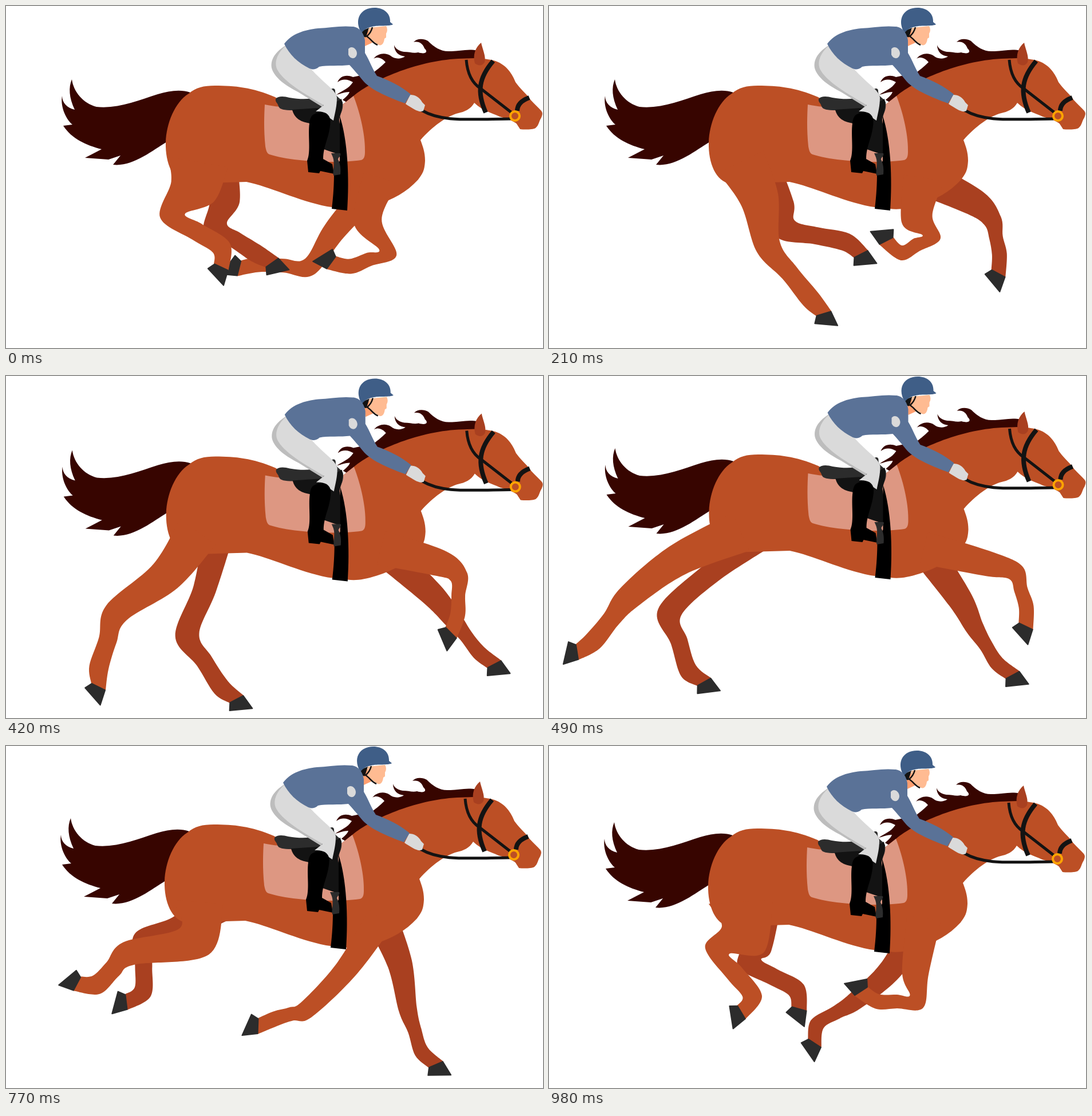
These frames come from a looping animation (938x597 px, 1050 ms). An HTML page with a canvas:

```html
<!DOCTYPE html>
<html lang="en">
<head>
<meta charset="utf-8">
<title>Gallop</title>
<style>
html, body { margin: 0; width: 100%; height: 100%; overflow: hidden; background: #fff; }
canvas { display: block; }
</style>
</head>
<body>
<canvas id="stage" width="938" height="597"></canvas>
<script>
const ctx = document.getElementById('stage').getContext('2d');
const STEP = 70, STEPS = 15;
const COAT = '#bc4f25', SHADE = '#a94020', HOOF = '#2c2c2c', MANE = '#370500',
      INK = '#131313', CLOTH = '#dadada', SILK = '#5a7297';

// A shape is [colour, path, stroke width (0 = fill)].
const shape = (color, d, width = 0) => [color, new Path2D(d), width];

const horse = [
  shape(MANE, 'M322 151C305 145 285 148 265 154C230 165 195 180 158 176C135 170 118 150 115 128C109 142 110 160 120 181C106 178 98 168 98 157C95 172 102 195 116 207L100 209C115 232 140 243 167 250L138 265L179 268L200 261L187 277C220 281 255 253 281 237L340 200Z'),
  shape(MANE, 'M820 95L824 78C805 74 790 80 775 79C760 80 748 72 737 61C728 56 717 57 712 63C722 61 728 66 731 74C738 80 733 85 720 81C712 83 705 80 695 80C685 78 680 74 678 68C678 80 686 87 697 88C688 94 678 92 672 87C663 81 650 82 642 92C650 87 658 92 663 98C655 106 645 114 640 117L606 124C595 119 583 122 579 133C588 126 598 128 606 133C598 145 588 147 577 155C585 153 592 150 600 150C598 156 592 160 588 164L595 168L650 145Z'),
  shape(COAT, 'M319 153C332 142 345 139 365 139C400 139 430 142 470 159L490 172L580 178L607 157C640 130 715 96 790 92L820 91C840 92 848 94 855 96C875 103 885 120 890 133C897 143 905 150 914 160C916 165 925 172 935 183C938 187 937 190 935 195C930 203 931 208 925 213C920 216 905 216 898 215C893 208 893 206 890 204C878 197 868 195 862 193C850 187 832 183 818 169C812 180 800 185 790 187C770 192 745 210 724 234C728 245 732 255 732 270C731 288 728 292 720 303C700 325 675 338 647 347C625 354 610 356 596 354C585 353 570 351 561 350C510 340 460 315 420 307L316 310C292 306 278 275 279 238C280 205 295 168 319 153Z'),
  shape(SHADE, 'M830 64C820 72 815 85 819 100C825 105 832 105 836 98C839 88 832 75 830 64Z')
];

const rider = [
  shape(INK, 'M804 94C806 120 815 135 829 144L883 186', 5),
  shape(INK, 'M851 96C826 125 822 150 838 186', 8),
  shape(INK, 'M914 160C900 165 893 172 893 183', 8),
  shape(INK, 'M726 182C760 202 800 198 881 197', 5),
  shape('#ffa400', 'M881 192a8 8 0 1 0 16 0a8 8 0 1 0-16 0Z', 4),
  shape('#dd9782', 'M452 172C470 176 485 176 500 178L588 172L607 157C620 190 628 230 627 255C627 263 625 268 620 269C580 275 500 272 460 259C455 257 454 250 453 245C450 215 451 190 452 172Z'),
  shape(HOOF, 'M471 162C475 157 485 157 495 160C530 166 550 160 565 147C570 142 576 143 575 150C576 160 585 160 588 168C590 185 582 192 575 200L530 205L500 182C487 182 478 181 476 175C474 168 470 168 471 162Z'),
  shape(INK, 'M500 181C520 180 540 178 560 177L586 162C590 182 582 192 582 200C586 220 586 240 584 260L552 249L535 205C515 204 503 195 500 181Z'),
  shape('#000', 'M583 192C597 235 600 300 596 357L569 354C572 330 573 310 573 290L583 270Z'),
  shape('#000', 'M540 188C552 182 562 184 566 190C568 205 565 220 560 235C557 245 554 255 554 267L570 276L573 293L549 288L547 292L528 290L526 270C533 255 527 225 530 205C531 195 534 190 540 188Z'),
  shape(HOOF, 'M568 257L584 257C586 262 580 264 580 268C584 275 585 285 584 294L572 296C570 288 575 275 571 264Z'),
  shape('#bdbdbd', 'M488 69C468 82 462 95 464 108C468 125 490 140 510 150L552 176L560 165Z'),
  shape(CLOTH, 'M488 70C471 85 468 102 475 113C488 135 530 158 555 173L541 184C552 184 562 185 566 196L572 200C575 185 578 175 578 160C578 148 555 135 532 109L500 78Z'),
  shape('#ff9f70', 'M624 45L640 40L640 64L627 70Z'),
  shape('#ffbb92', 'M634 38L664 35C667 40 666 45 664 48L664 55L661 57C660 65 657 70 651 68C645 65 645 62 640 64L633 55Z'),
  shape(INK, 'M620 44C622 52 626 56 629 54L634 38Z'),
  shape(INK, 'M640 37C638 45 635 49 630 53C637 57 641 65 649 68', 2.5),
  shape('#3f5e87', 'M621 47C610 30 614 9 635 4C655 0 672 10 671 28L676 32C670 36 650 33 640 36C630 38 625 42 621 47Z'),
  shape(CLOTH, 'M706 155C715 155 722 159 727 168L732 173L729 183C722 187 712 180 698 171Z'),
  shape(SILK, 'M486 66C500 48 520 42 545 39C565 38 585 34 605 36C615 36 625 45 627 60L627 82C635 95 640 110 648 122C670 130 690 140 707 154L697 170C670 160 640 148 625 132C615 120 605 108 600 103C585 105 560 103 547 106C540 112 535 111 530 109C510 99 495 85 486 66Z'),
  shape(CLOTH, 'M598 75C603 68 613 74 613 83C612 93 602 94 598 85Z')
];

// Anatomy: fixed hip and half widths. Legs in order: near hind, far hind, two fore legs.
const fore = { hip: [655, 300], thigh: 28, knee: 16, cannon: 12 };
const anatomy = [
  { hip: [335, 272], thigh: 42, knee: 22, cannon: 16 },
  { hip: [370, 280], thigh: 27, knee: 21, cannon: 15 },
  fore, fore
];

const sub = (a, b) => [a[0] - b[0], a[1] - b[1]];
const add = (a, b, k = 1) => [a[0] + b[0] * k, a[1] + b[1] * k];
const lerp = (a, b, k) => add(a, sub(b, a), k);
const unit = v => [v[0] / Math.hypot(...v), v[1] / Math.hypot(...v)];
const polar = deg => [Math.cos(deg * Math.PI / 180), Math.sin(deg * Math.PI / 180)];
const forward = d => [d[1], -d[0]];

// Each leg pose: thigh, knee and top of the hoof, then the hoof's direction in degrees.
const pose = (step, dx, dy, ...legs) => ({
  step, shift: [dx, dy],
  legs: legs.map(([tx, ty, kx, ky, hx, hy, angle], i) => {
    const joints = [anatomy[i].hip, [tx, ty], [kx, ky], [hx, hy]];
    return { bones: joints.slice(1).map((p, j) => sub(p, joints[j])), angle };
  })
});

const poses = [
  pose(0, 0, 0, [326, 324, 291, 366, 376, 456, 115], [382, 340, 366, 386, 465, 448, 55],
    [632, 376, 667, 430, 568, 448, 216], [575, 391, 530, 455, 407, 458, 194]),
  pose(3, 0, 0, [368, 338, 383, 420, 480, 537, 73], [404, 350, 415, 390, 545, 433, 63],
    [745, 344, 775, 375, 785, 467, 118], [643, 372, 668, 403, 589, 410, 243]),
  pose(5, 1, 5, [327, 341, 240, 405, 277, 534, 62], [406, 355, 412, 425, 523, 522, 64],
    [770, 365, 815, 400, 893, 474, 63], [752, 327, 768, 350, 722, 441, 154]),
  pose(7, .5, -2, [224, 322, 140, 386, 49, 482, 171], [284, 343, 211, 412, 271, 534, 61],
    [718, 390, 744, 440, 810, 522, 62], [768, 328, 815, 343, 833, 437, 116]),
  pose(9, -4, -2, [282, 310, 165, 345, 36, 405, 186], [225, 355, 153, 410, 57, 495, 178],
    [589, 378, 560, 460, 570, 536, 65], [752, 374, 814, 423, 904, 481, 53]),
  pose(11, -2, -2, [329, 341, 215, 362, 124, 415, 208], [300, 320, 242, 340, 210, 447, 173],
    [594, 390, 525, 460, 440, 489, 182], [688, 380, 702, 460, 751, 556, 67]),
  pose(14, -1, 5, [339, 337, 294, 357, 336, 465, 149], [362, 352, 351, 380, 437, 459, 106],
    [640, 397, 642, 446, 545, 428, 237], [597, 390, 535, 445, 464, 519, 123])
];

// Turns and stretches one bone towards another.
function turn(u, v, k) {
  const angle = k * Math.atan2(u[0] * v[1] - u[1] * v[0], u[0] * v[0] + u[1] * v[1]);
  const size = 1 + k * (Math.hypot(...v) / Math.hypot(...u) - 1);
  const c = size * Math.cos(angle), s = size * Math.sin(angle);
  return [u[0] * c - u[1] * s, u[0] * s + u[1] * c];
}

const mixLeg = (p, q, k) => ({
  bones: p.bones.map((b, i) => turn(b, q.bones[i], k)),
  angle: p.angle + (q.angle - p.angle) * k
});

function smooth(p) {
  ctx.lineTo(...p[0]);
  for (let i = 0; i < p.length - 1; i++) {
    const a = p[i], b = p[i + 1], before = p[i - 1] || a, after = p[i + 2] || b;
    ctx.bezierCurveTo(...add(a, sub(b, before), 1 / 6), ...add(b, sub(after, a), -1 / 6), ...b);
  }
}

function drawLeg({ bones, angle }, { hip, thigh, knee, cannon }, color) {
  const [stifle, hock, top] = bones.map((_, i) => bones.slice(0, i + 1).reduce((p, b) => add(p, b), hip));
  const down = polar(angle), across = forward(down);
  // The pastern leans back from the hoof by a constant angle.
  const fetlock = add(top, polar(angle - 25), -34);
  const joints = [hip, stifle, hock, lerp(hock, fetlock, .5), fetlock, top];
  // A shorter upper leg is a thicker one.
  const bulk = thigh * Math.sqrt(100 / Math.hypot(...sub(hock, hip)));
  const widths = [bulk * 1.3, bulk, knee, cannon, cannon + 1, 14];

  const dirs = joints.slice(1).map((p, i) => unit(sub(p, joints[i])));
  const sides = joints.map((p, i) => {
    const along = i === 0 ? dirs[0] : i === 5 ? down : unit(add(dirs[i - 1], dirs[i]));
    return [1, -1].map(s => add(p, forward(along), s * widths[i]));
  });
  ctx.fillStyle = color;
  ctx.beginPath();
  smooth(sides.map(s => s[0]));
  smooth(sides.map(s => s[1]).reverse());
  ctx.fill();

  ctx.fillStyle = ctx.strokeStyle = HOOF;
  ctx.lineWidth = 2;
  ctx.beginPath();
  for (const [x, y] of [[13, 0], [17, 27], [-20, 12], [-13, 0]])
    ctx.lineTo(...add(add(top, across, x), down, y));
  ctx.closePath();
  ctx.fill();
  ctx.stroke();
}

function drawShapes(shapes, [dx, dy]) {
  ctx.save();
  ctx.translate(dx, dy);
  for (const [color, path, width] of shapes) {
    ctx.fillStyle = ctx.strokeStyle = color;
    ctx.lineWidth = width;
    if (width) ctx.stroke(path); else ctx.fill(path);
  }
  ctx.restore();
}

function draw(step) {
  const i = poses.findLastIndex(p => p.step <= step);
  const p = poses[i], q = poses[i + 1] || p;
  const k = (step - p.step) / (q.step - p.step || 1);
  const shift = lerp(p.shift, q.shift, k);
  const leg = (n, color) => drawLeg(mixLeg(p.legs[n], q.legs[n], k), anatomy[n], color);
  // The fore legs trade sides partway through the stride.
  const front = step > 0 && step < 9 ? 3 : 2;

  ctx.fillStyle = '#fff';
  ctx.fillRect(0, 0, 938, 597);
  ctx.lineJoin = 'round';
  leg(5 - front, step ? SHADE : COAT);
  leg(1, SHADE);
  drawShapes(horse, shift);
  leg(front, COAT);
  leg(0, COAT);
  drawShapes(rider, shift);
}

const start = performance.now();
function tick() {
  draw(Math.floor((performance.now() - start) / STEP) % STEPS);
  requestAnimationFrame(tick);
}
tick();
</script>
</body>
</html>
```
